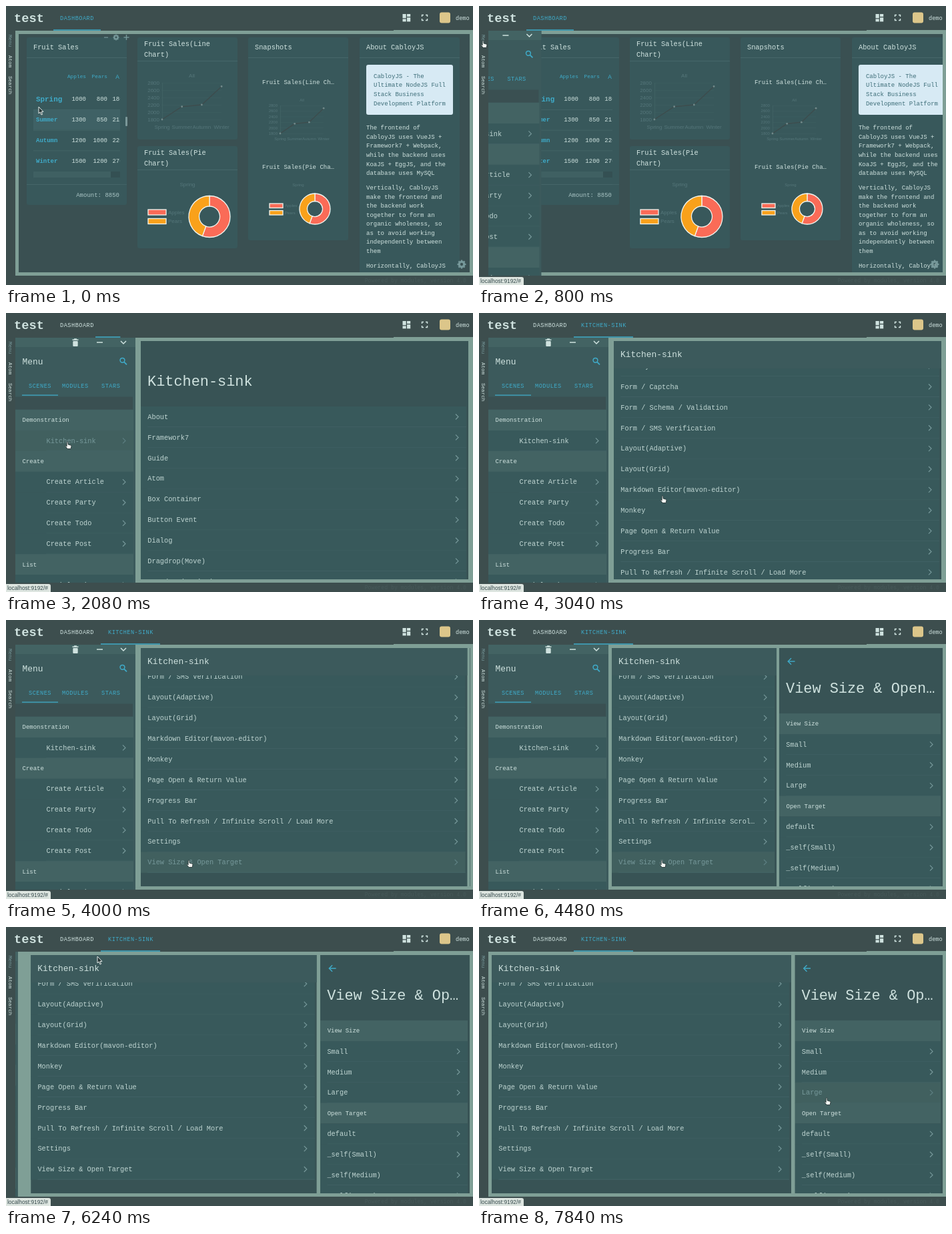
Animation, 700 px wide and 418 px high, one loop 8000 ms. Source, as an HTML page with a canvas:

```html
<!DOCTYPE html>
<html lang="en">
<head>
<meta charset="utf-8">
<title>Dashboard tour</title>
<style>
html, body { margin: 0; width: 100%; height: 100%; overflow: hidden; background: #3d4e4e; }
canvas { display: block; }
</style>
</head>
<body>
<canvas id="stage" width="700" height="418"></canvas>
<script>
const ctx = document.getElementById('stage').getContext('2d');
const LOOP = 8000, ROW = 30.88;
const MONO = '"Liberation Mono", monospace', SANS = '"Liberation Sans", sans-serif';
const C = {
  frame: '#3d4e4e', band: '#7f9f96', page: '#3a5052', card: '#38585b', bar: '#385355', nav: '#3c5a5c', row: '#38595b',
  section: '#436363', pressed: '#41605f', line: '#46676a', text: '#cfe2df', item: '#bfd5d2', soft: '#a9c4c4',
  dim: '#76989a', blue: '#3fabc9', chart: '#55767a', red: '#fa6b57', orange: '#f9a11b'
};

const clamp = v => Math.max(0, Math.min(1, v));
const mix = (a, b, p) => a + (b - a) * p;
const easeOut = (t, a, b) => 1 - (1 - clamp((t - a) / (b - a))) ** 2;

// Interpolates rows of [time, value, value...]
function track(keys, t, ease = p => p) {
  let i = 0;
  while (i < keys.length - 2 && t > keys[i + 1][0]) i++;
  const [a, b] = [keys[i], keys[i + 1]];
  const p = ease(clamp((t - a[0]) / (b[0] - a[0])));
  return a.slice(1).map((v, j) => mix(v, b[j + 1], p));
}

function rect(x, y, w, h, color, r = 0) {
  ctx.fillStyle = color;
  ctx.beginPath();
  ctx.roundRect(x, y, w, h, r);
  ctx.fill();
}

function text(s, x, y, size = 10.3, color = C.text, { align = 'left', bold = false, font = MONO, gap = 0 } = {}) {
  ctx.font = `${bold ? 'bold ' : ''}${size}px ${font}`;
  ctx.letterSpacing = gap + 'px';
  ctx.textAlign = align;
  ctx.fillStyle = color;
  ctx.fillText(s, x, y + size * 0.32);
}

function path(points, color, width = 1, fill) {
  ctx.beginPath();
  points.forEach(([x, y]) => ctx.lineTo(x, y));
  if (fill) {
    ctx.closePath();
    ctx.fillStyle = fill;
    ctx.fill();
  }
  ctx.strokeStyle = color;
  ctx.lineWidth = width;
  ctx.stroke();
}

function circle(x, y, r, color, width) {
  ctx.beginPath();
  ctx.arc(x, y, r, 0, 7);
  ctx.strokeStyle = color;
  ctx.lineWidth = width;
  ctx.stroke();
}

function clipped(x, y, w, h, draw) {
  ctx.save();
  ctx.beginPath();
  ctx.rect(x, y, w, h);
  ctx.clip();
  draw();
  ctx.restore();
}

const chevron = (x, y, color = C.dim) => path([[x - 2, y - 4], [x + 2, y], [x - 2, y + 4]], color, 1.2);
const cut = (s, n) => s.length > n ? s.slice(0, n - 1) + '…' : s;

function gear(x, y, r, color) {
  circle(x, y, r * 0.58, color, r * 0.5);
  for (let i = 0; i < 8; i++) {
    const a = i * Math.PI / 4, [c, s] = [Math.cos(a), Math.sin(a)];
    path([[x + c * r * 0.7, y + s * r * 0.7], [x + c * r, y + s * r]], color, r * 0.35);
  }
}

/* Dashboard */
const FRUIT = [['Spring', 1000, 800], ['Summer', 1300, 850], ['Autumn', 1200, 1000], ['Winter', 1500, 1200]];

function card(x, y, w, h, ...lines) {
  rect(x, y, w, h, C.card, 3);
  const first = lines.length > 1 ? 10 : 15;
  lines.forEach((s, i) => text(s, x + 10, y + first + i * 15.7));
  rect(x, y + (lines.length > 1 ? 35 : 30), w, 1, C.line);
}

function lineChart(x, base, dx, k, size) {
  const opt = { font: SANS };
  const spot = v => base - (v - 1800) * k;
  for (let v = 1800; v <= 2800; v += 200) {
    rect(x, spot(v), dx * 3, 0.5, '#3f6063');
    text(v, x - 4, spot(v), size, C.chart, { ...opt, align: 'right' });
  }
  rect(x, spot(2800), 0.6, 1000 * k, '#47686a');
  text('All', x + dx * 1.5, base - 1200 * k, size, C.chart, { ...opt, align: 'center' });
  const points = FRUIT.map(([, a, b], i) => [x + i * dx, spot(a + b)]);
  path(points, '#3d4c4d', 1.4);
  points.forEach(([px, py], i) => {
    rect(px - 1.4, py - 1.4, 2.8, 2.8, '#71898a', 1.4);
    text(FRUIT[i][0], px, base + 11 * k / 0.055, size, C.chart, { ...opt, align: 'center' });
  });
}

function pie(cx, cy, r, lx, ly, lw, lh, gap, tx, ty, size) {
  const top = -Math.PI / 2, split = top + Math.PI * 2 * 1000 / 1800;
  [['Apples', C.red, top, split], ['Pears', C.orange, split, top + Math.PI * 2]].forEach(([name, color, a, b], i) => {
    ctx.beginPath();
    ctx.arc(cx, cy, r, a, b);
    ctx.arc(cx, cy, r / 2, b, a, true);
    ctx.closePath();
    ctx.fillStyle = color;
    ctx.fill();
    ctx.strokeStyle = '#f2f4ee';
    ctx.lineWidth = 1.3;
    ctx.stroke();
    const y = ly + i * gap;
    rect(lx, y, lw, lh, color);
    ctx.strokeRect(lx, y, lw, lh);
    text(name, lx + lw + 3, y + lh / 2, size, C.chart, { font: SANS });
  });
  text('Spring', tx, ty, size, C.chart, { font: SANS, align: 'center' });
}

function table(x, cols, amountX, amountY) {
  const right = { align: 'right' };
  ['Apples', 'Pears', 'All'].forEach((s, i) =>
    text(s, cols[i], 106, i < 2 ? 7.8 : 9.3, C.blue, right));
  FRUIT.forEach(([name, a, b], i) => {
    const y = 139.5 + i * 30.8;
    text(name, x, y, i ? 9 : 10.9, C.blue, { bold: true });
    [a, b, a + b].forEach((v, j) => text(v, cols[j], y, 9, C.text, right));
    if (i < 3) rect(x - 4, y + 15.5, cols[2] - x + 8, 0.7, C.line);
  });
  rect(x - 14, amountY - 16, amountX - x + 24, 0.8, C.line);
  text('Amount: 8850', amountX, amountY, 9, C.soft, right);
}

function wideBoard() {
  card(211, 47, 228, 241, 'Fruit Sales');
  table(225, [336, 382, 425], 429, 273);
  card(453, 47, 228, 147, 'Fruit Sales(Line Chart)');
  lineChart(490, 165, 56, 0.055, 8);
  card(453, 205, 228, 147, 'Fruit Sales(Pie Chart)');
  pie(600, 306, 37, 469, 294, 27, 8.5, 14, 567, 257, 8);
  card(211, 363, 228, 60, 'Snapshots');
  card(453, 363, 228, 60, 'About CabloyJS');
}

const ABOUT = ['The frontend of', 'CabloyJS uses VueJS +', 'Framework7 + Webpack,', 'while the backend uses',
  'KoaJS + EggJS, and the', 'database uses MySQL', 'Vertically, CabloyJS', 'make the frontend and',
  'the backend work', 'together to form an', 'organic wholeness, so', 'as to avoid working',
  'independently between', 'them', 'Horizontally, CabloyJS'];
const BANNER = ['CabloyJS - The', 'Ultimate NodeJS Full', 'Stack Business', 'Development Platform'];

function narrowBoard(hover) {
  card(31, 47, 150, 251, 'Fruit Sales');
  if (hover) {
    rect(41, 155.5, 130, 30, '#3f6165');
    rect(147, 46.5, 6, 1.2, C.dim);
    gear(165, 47, 4.5, C.dim);
    path([[176.5, 47], [184.5, 47]], C.dim, 1.4);
    path([[180.5, 43], [180.5, 51]], C.dim, 1.4);
    rect(179, 166, 3, 14, '#7b9799', 1);
  }
  clipped(31, 47, 140, 251, () => table(45, [120, 152, 181], 170, 283));
  rect(31, 267, 150, 0.8, C.line);
  rect(41, 248, 130, 9, '#3f6062');
  rect(157, 248, 14, 9, '#345053');

  card(197, 47, 150, 153, 'Fruit Sales(Line', 'Chart)');
  lineChart(234, 170, 29.7, 0.055, 8);
  card(197, 210, 150, 153, 'Fruit Sales(Pie', 'Chart)');
  pie(305, 315.5, 31, 213, 305, 27, 8, 13.5, 272, 267, 8);

  card(363, 47, 150, 304, 'Snapshots');
  text('Fruit Sales(Line Ch…', 438, 114, 9, C.text, { align: 'center' });
  lineChart(411, 191, 21.7, 0.042, 6);
  text('Fruit Sales(Pie Cha…', 438, 241, 9, C.text, { align: 'center' });
  pie(463, 304, 23, 395, 296, 20, 6.5, 10.5, 438, 268, 6);

  card(530, 47, 150, 360, 'About CabloyJS');
  rect(540, 88, 130, 75, '#d7eaf4', 3);
  BANNER.forEach((s, i) => text(s, 551, 105 + i * 13.6, 9, '#3d6d78'));
  ABOUT.forEach((s, i) => text(s, 540, 182.5 + i * 13.55 + (i > 5 ? 8.5 : 0) + (i > 13 ? 8.5 : 0), 9, C.text));
}

/* List pages */
const SINK = ['About', 'Framework7', 'Guide', 'Atom', 'Box Container', 'Button Event', 'Dialog', 'Dragdrop(Move)',
  'Dragdrop(Resize)', 'Gallery', 'Form / Captcha', 'Form / Schema / Validation', 'Form / SMS Verification',
  'Layout(Adaptive)', 'Layout(Grid)', 'Markdown Editor(mavon-editor)', 'Monkey', 'Page Open & Return Value',
  'Progress Bar', 'Pull To Refresh / Infinite Scroll / Load More', 'Settings', 'View Size & Open Target'];
const SIZES = ['#View Size', 'Small', 'Medium', 'Large', '#Open Target', 'default', '_self(Small)',
  '_self(Medium)', '_self(Large)'];

function item(s, x, y, left, right, pressed, limit = 99) {
  if (s[0] === '#') {
    rect(left, y, right - left, ROW, C.section);
    text(s.slice(1), left + 10.5, y + 15.5, 9);
    return;
  }
  rect(left, y, right - left, ROW + 0.5, pressed ? C.pressed : C.row);
  rect(x, y + ROW - 0.5, right - x, 0.6, C.line);
  text(cut(s, limit), x, y + 15.5, 10.3, pressed ? C.dim : C.item);
  chevron(right - 14, y + 15.5, pressed ? '#5d7f82' : C.dim);
}

function listPage(x, right, title, rows, scroll, pressed, back) {
  const w = right - x;
  clipped(x, 42, w, 357, () => {
    rect(x, 42, w, 357, C.bar);
    rows.forEach((s, i) => {
      const y = 140 + i * ROW - scroll;
      if (y > 42 && y < 399) item(s, x + 10.3, y, x, right - 3, s === pressed, Math.floor((w - 42) / 6.18));
    });
    const small = clamp((scroll - 20) / 30);
    rect(x, 42, w, Math.max(83, 140 - scroll) - 42, small < 1 ? C.bar : C.nav);
    ctx.globalAlpha = 1 - small;
    text(cut(title, Math.floor((w - 20) / 13.17)), x + 10, 102 - scroll, 21.9);
    ctx.globalAlpha = small;
    text(title, x + 10, 62, 12.9);
    ctx.globalAlpha = 1;
    if (back) {
      path([[x + 23.5, 62], [x + 13.5, 62]], C.blue, 1.4);
      path([[x + 18, 57.2], [x + 13.2, 62], [x + 18, 66.8]], C.blue, 1.4);
    }
  });
}

/* Menu and frame */
const MENU = ['#Demonstration', 'Kitchen-sink', '#Create', 'Create Article', 'Create Party', 'Create Todo',
  'Create Post', '#List', 'Article List'];

function menu(shift, pressed) {
  ctx.save();
  ctx.translate(shift, 0);
  rect(14, 37, 180, 367, C.nav);
  rect(14, 37, 180, 14, C.section);
  rect(99.5, 39.5, 9, 1.5, C.text);
  rect(102, 38.3, 4, 1.5, C.text);
  rect(100.3, 42, 7.4, 8, C.text, 1);
  rect(136, 43.3, 9, 1.5, C.text);
  path([[172, 42], [176, 46], [180, 42]], C.text, 1.5);
  text('Menu', 24.5, 72.5, 12.9);
  circle(174.5, 70.8, 3.4, C.blue, 1.5);
  path([[177, 73.3], [181, 77.3]], C.blue, 1.8);
  [['SCENES', 34], ['MODULES', 84], ['STARS', 143]].forEach(([s, x]) => text(s, x, 109, 8.6, C.blue, { gap: 0.5 }));
  rect(24, 122.5, 54, 1.3, C.blue);
  rect(14, 125.5, 176, 19, C.page);
  MENU.forEach((s, i) => item(s, 60.5, 145 + i * ROW, 14, 191, pressed && i === 1));
  ctx.restore();
}

function frame(t) {
  rect(0, 0, 700, 37, C.frame);
  rect(581, 36, 119, 1.5, C.band);
  rect(0, 37, 14, 367, C.frame);
  rect(0, 404, 700, 14, C.frame);
  text('test', 12, 18, 18.7, C.text, { bold: true });
  const sink = t >= 2160, tab = { gap: 0.5 };
  text('DASHBOARD', 81, 18, 8.6, t < 1960 ? C.blue : C.text, tab);
  if (sink) text('KITCHEN-SINK', 153, 18, 8.6, C.blue, tab);
  const [a, b] = track([[1960, 71, 142], [2080, 134, 171], [2240, 142, 231]], t);
  rect(a, 35.3, b - a, 1.5, C.blue);

  [[594.5, 12, 5.2, 6.2], [601, 12, 5.2, 4], [594.5, 19.4, 5.2, 4], [601, 17.2, 5.2, 6.2]]
    .forEach(q => rect(...q, C.text));
  for (const sx of [-1, 1]) for (const sy of [-1, 1])
    path([[627.5 + sx * 4, 17.5 + sy * 1.5], [627.5 + sx * 4, 17.5 + sy * 4], [627.5 + sx * 1.5, 17.5 + sy * 4]], C.text, 1.4);
  rect(650, 9.5, 16, 16, '#dcc68a', 3);
  text('demo', 674, 17.8, 8.6);

  [['Menu', 43, C.dim], ['Atom', 74, C.text], ['Search', 105, C.text]].forEach(([s, y, color]) => {
    ctx.save();
    ctx.translate(6, y);
    ctx.rotate(Math.PI / 2);
    text(s, 0, 0, 7.6, color);
    ctx.restore();
  });
  text('Powered by modules, version 4.0', 690, 411.5, 8.2, '#475a5a', { align: 'right' });
  if (t >= 480) {
    rect(0, 406, 67, 12, '#dde5e0', [0, 3, 0, 0]);
    text('localhost:9192/#', 2, 412, 8.4, '#34494b', { font: SANS });
  }
}

const MOVES = [[160, 49, 151], [480, 6, 52], [1040, 6, 52], [1520, 92, 193], [2320, 92, 193], [2560, 275, 274],
  [3440, 275, 274], [3840, 274, 360], [4560, 274, 360], [5600, 137, 44], [6320, 137, 44], [6560, 390, 180],
  [6800, 390, 180], [7040, 521, 256], [8000, 521, 256]];
const ARROW = [[0, 0], [0, 10], [2.3, 8], [4, 12], [5.6, 11.3], [4, 7.6], [7, 7.4]];
const HAND = [[-0.9, 0.4], [0, -0.3], [0.9, 0.4], [1.1, 4], [5.4, 5.2], [6, 6.4], [5.2, 10.5], [0.2, 10.5],
  [-3, 6.6], [-2.6, 5.6], [-0.9, 6.8]];

function cursor(t) {
  const [x, y] = track(MOVES, t, p => p * p * (3 - 2 * p));
  const hand = (t > 400 && t < 1120) || (t > 1440 && t < 6000) || t > 6400;
  ctx.save();
  ctx.translate(x, y);
  if (hand) path(HAND, '#263536', 0.9, '#f2f5f2');
  else path([...ARROW, ARROW[0]], '#e4ecea', 1, '#263536');
  ctx.restore();
}

function draw(t) {
  const slide = t < 5000 ? easeOut(t, 700, 1100) : 1 - easeOut(t, 5900, 6300);
  const room = t < 5000 ? easeOut(t, 768, 1168) : 1 - easeOut(t, 5968, 6368);
  const split = easeOut(t, 4000, 4360);
  const left = mix(19, mix(202, 199, split), room);
  rect(0, 0, 700, 418, C.band);

  if (t < 1920) {
    clipped(left, 42, 695 - left, 357, () => {
      rect(left, 42, 695 - left, 357, C.page);
      const wide = left > 110;
      ctx.save();
      ctx.translate(left - (wide ? 202 : 19), 0);
      if (wide) wideBoard();
      else narrowBoard(t < 320);
      ctx.restore();
      gear(683, 387, 6.5, C.dim);
    });
  } else {
    const right = mix(693, mix(468, 446, room), split);
    const [scroll] = track([[2560, 0], [3040, 353.3], [3200, 441]], t);
    listPage(left, right, 'Kitchen-sink', SINK, scroll, t > 3960 && t < 4640 && SINK[21]);
    if (split > 0)
      listPage(right + mix(5.5, 4, room), 695, 'View Size & Open Target', SIZES, 0, t > 7640 && 'Large', true);
  }
  if (slide > 0) menu(-180 * (1 - slide), t > 1600 && t < 2240);
  frame(t);
  cursor(t);
}

const start = performance.now();
function tick() {
  draw((performance.now() - start) % LOOP);
  requestAnimationFrame(tick);
}
tick();
</script>
</body>
</html>
```
